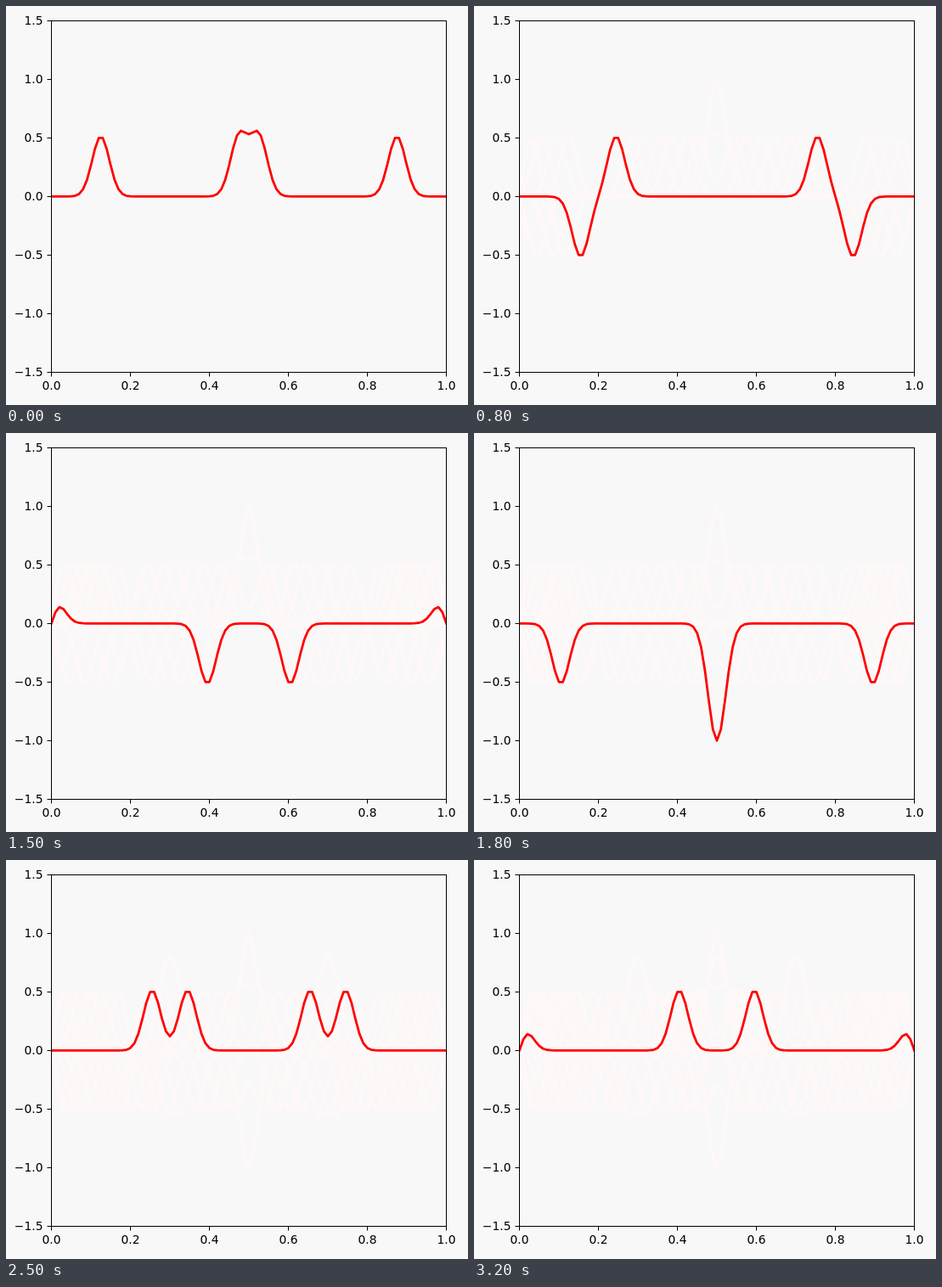
Animation, 544 px wide and 470 px high, one loop 3.3 s. Source, as an HTML page with a canvas:

```html
<!DOCTYPE html>
<html lang="en">
<head>
<meta charset="utf-8">
<title>Wave equation</title>
<style>
html, body { margin: 0; height: 100%; overflow: hidden; background: #f8f8f8; }
canvas { display: block; }
</style>
</head>
<body>
<canvas id="plot" width="544" height="470"></canvas>
<script>
const ctx = document.getElementById('plot').getContext('2d');
const CELLS = 100, STEP_MS = 100, STEPS = 33;
const BOX = { left: 53.5, top: 17.5, width: 465, height: 414 };
const px = x => BOX.left + x * BOX.width;
const py = y => 224.35 - y * 138;

// Leapfrog solution of the wave equation with fixed ends, starting at rest.
function solve() {
  const bump = (x, c) => Math.exp(-1000 * (x - c) ** 2);
  const start = Array.from({ length: CELLS + 1 }, (_, j) =>
    bump(j / CELLS, 0.3) + bump(j / CELLS, 0.7));
  const states = [start, start];
  while (states.length < 100) {
    const [prev, now] = states.slice(-2);
    states.push(now.map((_, j) =>
      j % CELLS ? now[j - 1] + now[j + 1] - prev[j] : 0));
  }
  return states;
}

const waves = solve();
const waveAt = step => waves[Math.floor((18.41 + 3.48 * step) % 99.5)];

function drawWave(wave, color, width) {
  ctx.beginPath();
  wave.forEach((u, j) => ctx.lineTo(px(j / CELLS), py(u)));
  ctx.strokeStyle = color;
  ctx.lineWidth = width;
  ctx.stroke();
}

function drawAxes() {
  ctx.strokeStyle = ctx.fillStyle = '#000';
  ctx.lineWidth = 1;
  ctx.font = '13.89px "DejaVu Sans", sans-serif';
  ctx.strokeRect(BOX.left, BOX.top, BOX.width, BOX.height);
  const bottom = BOX.top + BOX.height;
  ctx.beginPath();
  ctx.textAlign = 'center';
  for (let i = 0; i <= 5; i++) {
    const x = px(i / 5);
    ctx.moveTo(x, bottom);
    ctx.lineTo(x, bottom + 5);
    ctx.fillText((i / 5).toFixed(1), x, 452);
  }
  ctx.textAlign = 'right';
  for (let i = 0; i <= 6; i++) {
    const y = BOX.top + i * 69;
    ctx.moveTo(BOX.left, y);
    ctx.lineTo(BOX.left - 5, y);
    ctx.fillText((1.5 - i / 2).toFixed(1).replace('-', '\u2212'), 43.5, y + 4.5);
  }
  ctx.stroke();
}

function draw(now) {
  const step = Math.floor(now / STEP_MS) % STEPS;
  ctx.fillStyle = '#f8f8f8';
  ctx.fillRect(0, 0, 544, 470);
  ctx.save();
  ctx.beginPath();
  ctx.rect(BOX.left, BOX.top, BOX.width, BOX.height);
  ctx.clip();
  ctx.lineJoin = 'round';
  ctx.lineCap = 'square';
  // Earlier waves leave a faint trail until the loop restarts.
  for (let i = 0; i < step; i++) drawWave(waveAt(i), '#fff8f8', 3.8);
  drawWave(waveAt(step), '#f00', 2.78);
  ctx.restore();
  drawAxes();
}

const begin = performance.now();
function tick() {
  draw(performance.now() - begin);
  requestAnimationFrame(tick);
}
tick();
</script>
</body>
</html>
```
